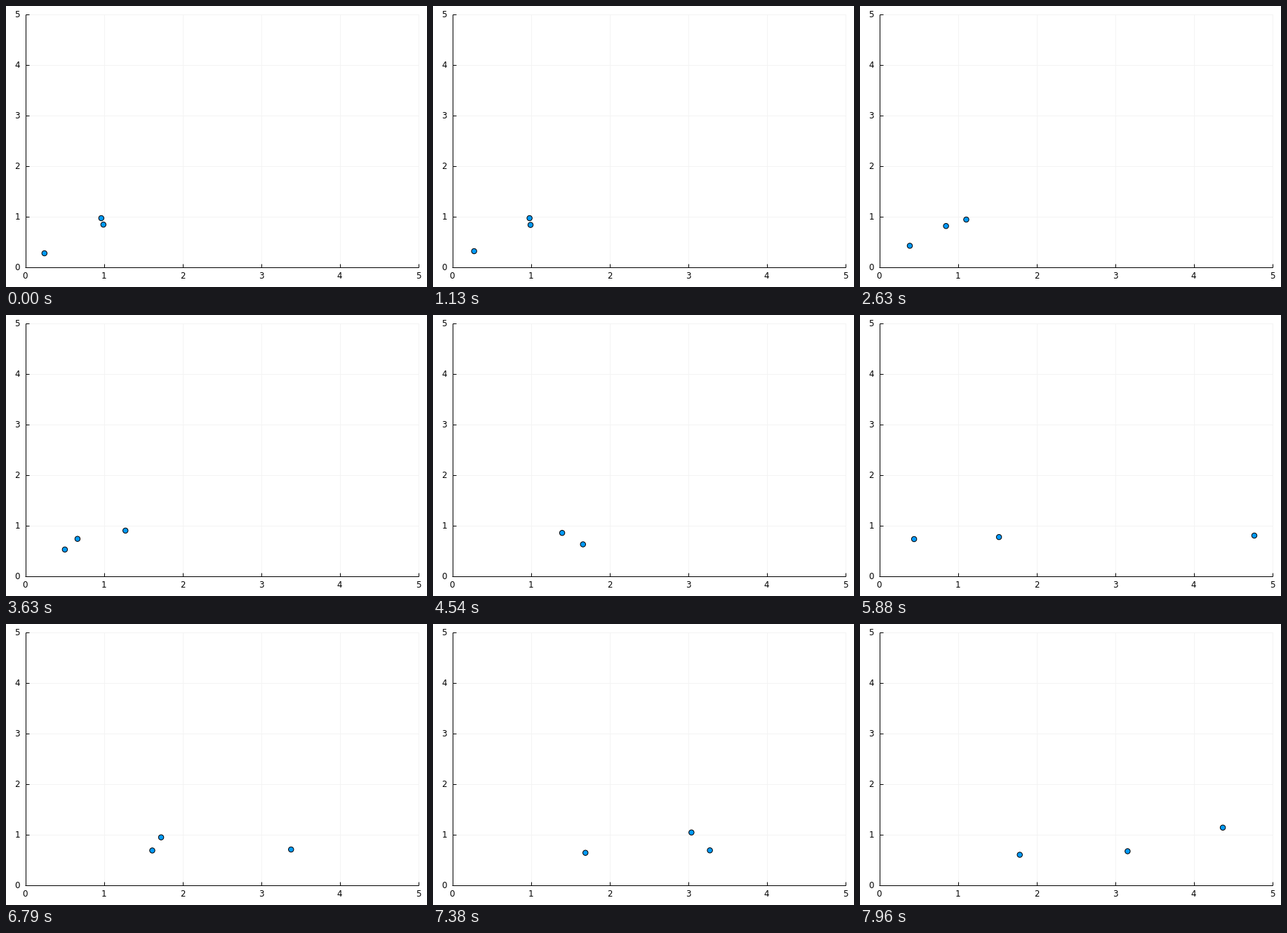
A matplotlib script that plays this animation: 600x400 px, repeating every 8 s.

```python
import matplotlib.pyplot as plt
from matplotlib.animation import FuncAnimation
from matplotlib.patches import Circle, Rectangle

W, H, DPI = 600, 400, 100
LOOP, TICK = 8000, 20      # ms
STEPS = 192                # simulation steps per loop, 24 per second
LEFT, RIGHT, TOP, BOTTOM = 27.5, 587.5, 11.5, 371.5
WIDTH, HEIGHT = RIGHT - LEFT, BOTTOM - TOP
PX = 72 / DPI              # one pixel in points

plt.rcParams["font.family"] = "DejaVu Sans"
fig = plt.figure(figsize=(W / DPI, H / DPI), dpi=DPI, facecolor="white")
ax = fig.add_axes([0, 0, 1, 1])
ax.set_xlim(0, W)
ax.set_ylim(H, 0)
ax.axis("off")


def line(x0, y0, x1, y1, color="black", z=2):
    ax.plot([x0, x1], [y0, y1], color=color, lw=PX, zorder=z,
            solid_capstyle="butt")


def draw_axes():
    for n in range(6):
        x, y = LEFT + n * WIDTH / 5, BOTTOM - n * HEIGHT / 5
        line(x, TOP, x, BOTTOM, "#f3f3f3", 1)
        line(LEFT, y, RIGHT, y, "#f3f3f3", 1)
        line(x, BOTTOM, x, BOTTOM - 5)
        line(LEFT, y, LEFT + 5.5, y)
        ax.text(x, 382.5, str(n), size=8.6, ha="center", va="center_baseline")
        ax.text(20, y, str(n), size=8.6, ha="right", va="center_baseline")
    line(LEFT, TOP, LEFT, BOTTOM + 0.5)
    line(LEFT - 0.5, BOTTOM, RIGHT + 0.5, BOTTOM)


def fly(pos, pushes):
    """Positions x + iy per step; a push sets velocity and acceleration.

    Past the right edge, one step is spent on jumping back a box width.
    """
    path = []
    for k in range(STEPS):
        if k in pushes:
            vel, acc = pushes[k]
        path.append(pos)
        pos += vel if pos.real <= RIGHT else -WIDTH
        vel += acc
    return path


paths = [
    # drawn in slowly, flung right by the encounter, then through the edge
    fly(54.8 + 352j, {
        0: (0.0567 - 0.0686j, 0.00646 - 0.00326j),
        98: (11.218 - 0.279j, -0.0127 - 0.0042j),
        145: (10.33 - 0.495j, 0.0077),
    }),
    # flung left out of view, back as a fast runner
    fly(138.8 + 311.2j, {
        0: (0.0074 + 0.015j, 0),
        27: (-0.2188 - 0.0627j, -0.01354 + 0.00612j),
        98: (-12.2 - 0.445j, 0),
        106: (0, 0),
        139: (42.45 + 0.095j, -0.0088),
    }),
    # drifts away to the right
    fly(135.8 + 302j, {
        0: (0.067, 0),
        27: (0.1076 + 0.0146j, 0.0158 + 0.00234j),
        80: (0.755 + 0.1267j, -0.00714 + 0.0013j),
        141: (0.382 + 0.3146j, 0.0086 - 0.00272j),
    }),
]

draw_axes()
window = Rectangle((LEFT - 0.5, TOP - 0.5), WIDTH + 1, HEIGHT + 1,
                   transform=ax.transData)
dots = []
for path in paths:
    dot = Circle((0, 0), 3.7, fc="#009af9", ec="black", lw=PX, zorder=3)
    ax.add_patch(dot)
    dot.set_clip_path(window)
    dots.append(dot)


def update(n):
    # the latest step that begins within this tick
    k = int((n + 0.95) * TICK * STEPS / LOOP)
    for dot, path in zip(dots, paths):
        dot.center = path[k].real, path[k].imag
    return dots


anim = FuncAnimation(fig, update, frames=LOOP // TICK, interval=TICK,
                     init_func=lambda: update(0), repeat=True, repeat_delay=0)
plt.show()
```
